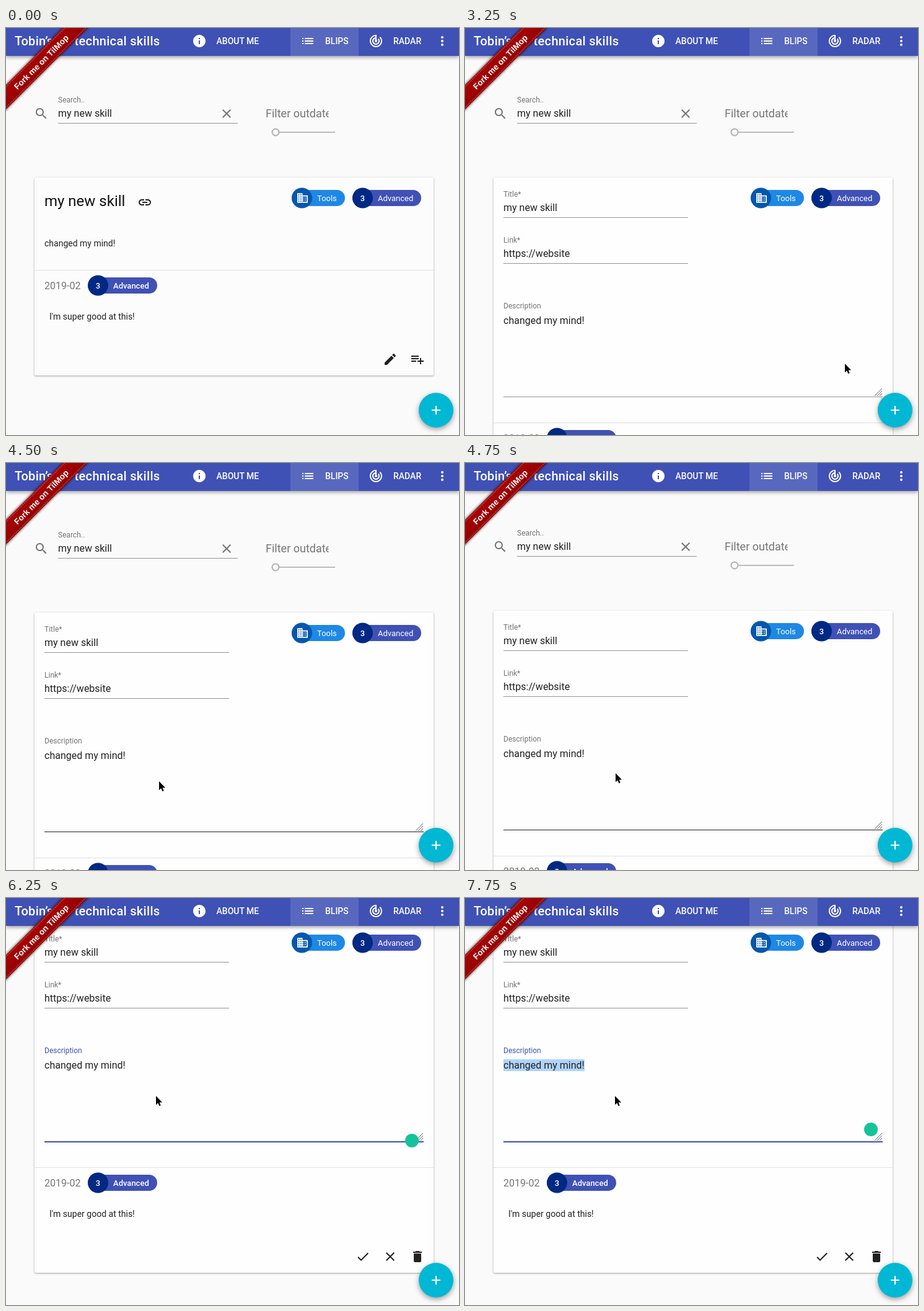
An HTML page that plays this animation: 731x656 px, repeating every 8 s.

```html
<!DOCTYPE html>
<html lang="en">
<head>
<meta charset="utf-8">
<title>Technical skills</title>
<style>
  html, body { margin: 0; width: 100%; height: 100%; overflow: hidden; background: #fafafa; }
  svg { display: block; font-family: Roboto, sans-serif; }
  .shadow { filter: drop-shadow(0 1px 1.5px rgba(0, 0, 0, .36)); }
  .bar { filter: drop-shadow(0 2px 3px rgba(0, 0, 0, .4)); }
  .fab { filter: drop-shadow(0 3px 4px rgba(0, 0, 0, .38)); }
  .ribbon { filter: drop-shadow(0 0 2px rgba(0, 0, 0, .85)); }
</style>
</head>
<body>
<svg id="stage" width="731" height="656"></svg>
<script>
const ICONS = {
  info: 'M12 2C6.48 2 2 6.48 2 12s4.48 10 10 10 10-4.48 10-10S17.52 2 12 2zm1 15h-2v-6h2v6zm0-8h-2V7h2v2z',
  list: 'M3 13h2v-2H3v2zm0 4h2v-2H3v2zm0-8h2V7H3v2zm4 4h14v-2H7v2zm0 4h14v-2H7v2zM7 7v2h14V7H7z',
  radar: 'M19.07 4.93l-1.41 1.41C19.1 7.79 20 9.79 20 12c0 4.42-3.58 8-8 8s-8-3.58-8-8c0-4.08 3.05-7.44 7-7.93v2.02C8.16 6.57 6 9.03 6 12c0 3.31 2.69 6 6 6s6-2.69 6-6c0-1.66-.67-3.16-1.76-4.24l-1.41 1.41C15.55 9.9 16 10.9 16 12c0 2.21-1.79 4-4 4s-4-1.79-4-4c0-1.86 1.28-3.41 3-3.86v2.14c-.6.35-1 .98-1 1.72 0 1.1.9 2 2 2s2-.9 2-2c0-.74-.4-1.38-1-1.72V2h-1C6.48 2 2 6.48 2 12s4.48 10 10 10 10-4.48 10-10c0-2.76-1.12-5.26-2.93-7.07z',
  more: 'M12 8c1.1 0 2-.9 2-2s-.9-2-2-2-2 .9-2 2 .9 2 2 2zm0 2c-1.1 0-2 .9-2 2s.9 2 2 2 2-.9 2-2-.9-2-2-2zm0 6c-1.1 0-2 .9-2 2s.9 2 2 2 2-.9 2-2-.9-2-2-2z',
  search: 'M15.5 14h-.79l-.28-.27C15.41 12.59 16 11.11 16 9.5 16 5.91 13.09 3 9.5 3S3 5.91 3 9.5 5.91 16 9.5 16c1.61 0 3.09-.59 4.23-1.57l.27.28v.79l5 4.99L20.49 19l-4.99-5zm-6 0C7.01 14 5 11.99 5 9.5S7.01 5 9.5 5 14 7.01 14 9.5 11.99 14 9.5 14z',
  clear: 'M19 6.41L17.59 5 12 10.59 6.41 5 5 6.41 10.59 12 5 17.59 6.41 19 12 13.41 17.59 19 19 17.59 13.41 12z',
  link: 'M3.9 12c0-1.71 1.39-3.1 3.1-3.1h4V7H7c-2.76 0-5 2.24-5 5s2.24 5 5 5h4v-1.9H7c-1.71 0-3.1-1.39-3.1-3.1zM8 13h8v-2H8v2zm9-6h-4v1.9h4c1.71 0 3.1 1.39 3.1 3.1s-1.39 3.1-3.1 3.1h-4V17h4c2.76 0 5-2.24 5-5s-2.24-5-5-5z',
  building: 'M12 7V3H2v18h20V7H12zM6 19H4v-2h2v2zm0-4H4v-2h2v2zm0-4H4V9h2v2zm0-4H4V5h2v2zm4 12H8v-2h2v2zm0-4H8v-2h2v2zm0-4H8V9h2v2zm0-4H8V5h2v2zm10 12h-8v-2h2v-2h-2v-2h2v-2h-2V9h8v10zm-2-8h-2v2h2v-2zm0 4h-2v2h2v-2z',
  edit: 'M3 17.25V21h3.75L17.81 9.94l-3.75-3.75L3 17.25zM20.71 7.04c.39-.39.39-1.02 0-1.41l-2.34-2.34c-.39-.39-1.02-.39-1.41 0l-1.83 1.83 3.75 3.75 1.83-1.83z',
  addList: 'M14 10H2v2h12v-2zm0-4H2v2h12V6zm4 8v-4h-2v4h-4v2h4v4h2v-4h4v-2h-4zM2 16h8v-2H2v2z',
  check: 'M9 16.17L4.83 12l-1.42 1.41L9 19 21 7l-1.41-1.41z',
  trash: 'M6 19c0 1.1.9 2 2 2h8c1.1 0 2-.9 2-2V7H6v12zM19 4h-3.5l-1-1h-5l-1 1H5v2h14V4z',
  plus: 'M19 13h-6v6h-2v-6H5v-2h6V5h2v6h6v2z'
};
const INK = '#212121', GREY = '#757575', LINE = '#949494', INDIGO = '#3f51b5', WHITE = '#fff';

const icon = (name, cx, cy, fill = INK, k = 1) =>
  `<path d="${ICONS[name]}" fill="${fill}" transform="translate(${cx - 12 * k} ${cy - 12 * k}) scale(${k})"/>`;
const text = (x, y, size, str, fill = INK, extra = '') =>
  `<text x="${x}" y="${y}" font-size="${size}" fill="${fill}" ${extra}>${str}</text>`;
const rect = (x, y, w, h, fill, extra = '') =>
  `<rect x="${x}" y="${y}" width="${w}" height="${h}" fill="${fill}" ${extra}/>`;
const circle = (x, y, r, fill, extra = '') =>
  `<circle cx="${x}" cy="${y}" r="${r}" fill="${fill}" ${extra}/>`;
const group = (content, extra = '') => `<g ${extra}>${content}</g>`;

const medium = 'font-weight="500"';
const middle = 'text-anchor="middle"';

function chip(x, cy, w, label, fill, badgeFill, badge, extra = '') {
  return rect(x, cy - 13, w, 26, fill, 'rx="13"') + circle(x + 16.5, cy, 16.5, badgeFill) +
    badge + text(x + 41, cy + 5, 13, label, WHITE, extra);
}
const advanced = (x, cy, w) => chip(x, cy, w, 'Advanced', INDIGO, '#002984',
  text(x + 16.5, cy + 5, 13, '3', WHITE, `${middle} ${medium}`), w > 111 ? medium : '');

const searchRow =
  icon('search', 57, 138, GREY) + text(84, 120, 12, 'Search..', GREY) +
  text(84, 143, 16, 'my new skill') + icon('clear', 356, 138, GREY) + rect(84, 153, 290, 1, LINE) +
  `<svg x="419" y="120" width="101.5" height="36">${text(0, 24, 18, 'Filter outdated', GREY)}</svg>` +
  rect(441, 167, 90, 2, '#bdbdbd') + circle(435, 168, 5.5, 'none', 'stroke="#b0b0b0" stroke-width="2"');

const chips = chip(461, 274, 86, 'Tools', '#1e88e5', '#0457ae', icon('building', 478.5, 274, WHITE, .85)) +
  advanced(559, 274, 111);

const history = rect(46, 390, 644, 1, '#e0e0e0') + text(62, 421, 16, '2019-02', GREY) +
  advanced(132, 415, 112) + text(70, 470, 14, "I'm super good at this!");

const viewMode = text(62, 287, 24, 'my new skill', '#111') + icon('link', 224, 281) +
  text(62, 352, 14, 'changed my mind!') +
  circle(620, 534, 18, '#e2e2e2', 'id="hover"') + icon('edit', 620, 534) + icon('addList', 664, 534);

const editMode =
  text(62, 272, 12, 'Title*', GREY) + text(62, 295, 16, 'my new skill') + rect(62, 305, 298, 1, LINE, 'id="titleLine"') +
  text(62, 346, 12, 'Link*', GREY) + text(62, 369, 16, 'https://website') + rect(62, 379, 298, 1, LINE, 'id="linkLine"') +
  text(62, 452, 12, 'Description', GREY, 'id="label"') +
  rect(62, 462, 131, 19, '#b0d3fb', 'id="selection"') + text(62, 477, 16, 'changed my mind!') +
  rect(193, 462, 1, 19, INK, 'id="caret"') +
  rect(62, 594, 612, 1, LINE, 'id="descLine"') + rect(62, 594, 612, 2, INDIGO, 'id="focusLine"') +
  '<path d="M661 593l12-12M665 593l8-8M669 593l4-4" stroke="#666" fill="none"/>' +
  circle(655, 593, 11, '#15c39a', 'id="badge"') +
  icon('check', 576, 780) + icon('clear', 620, 780) + icon('trash', 664, 780);

const header = rect(0, -5, 731, 50, INDIGO, 'class="bar"') + rect(459, 0, 110, 45, 'rgba(255,255,255,.13)') +
  text(14, 28, 20, 'Tobin’s', WHITE, `${medium} letter-spacing=".3"`) +
  text(248.5, 28, 20, 'technical skills', WHITE, `${medium} letter-spacing=".3" text-anchor="end"`) +
  icon('info', 312, 21, WHITE) + text(339.5, 26, 14, 'ABOUT ME', WHITE, medium) +
  icon('list', 487, 21, WHITE) + text(515, 26, 14, 'BLIPS', WHITE, medium) +
  icon('radar', 597, 21, WHITE) + text(625, 26, 14, 'RADAR', WHITE, medium) + icon('more', 704, 21, WHITE);

const stitch = y => `<path d="M-110 ${y}H110" stroke="#e0b0b0" stroke-width=".8" stroke-dasharray="2 1.5"/>`;
const ribbon = group(
  rect(-110, -14, 220, 28, 'url(#red)', 'class="ribbon"') + stitch(-12) + stitch(12) +
  text(1, 5, 13.3, 'Fork me on TilMop', WHITE, `${middle} font-weight="700" font-family="Liberation Sans, sans-serif"`),
  'transform="translate(56 55.5) rotate(-45)"');

const stage = document.getElementById('stage');
stage.innerHTML =
  '<linearGradient id="red" x2="0" y2="1"><stop stop-color="#a80505"/><stop offset="1" stop-color="#960000"/></linearGradient>' +
  group(searchRow + rect(46, 241, 644, 319, '#fdfdfd', 'id="card" rx="2" class="shadow"') + chips +
    group(history, 'id="history"') + group(viewMode, 'id="view"') + group(editMode, 'id="edit"'), 'id="page"') +
  header + ribbon +
  group(circle(694, 616, 28, '#00b8d4'), 'class="fab"') + icon('plus', 694, 616, WHITE) +
  '<path id="cursor" d="M0 0v14.2l3.2-3 2.2 5 2.3-1-2.1-4.8h4.6z" stroke="#fff" stroke-width="1.6" paint-order="stroke"/>';

const ui = {};
stage.querySelectorAll('[id]').forEach(el => ui[el.id] = el);
const show = (el, on) => el.setAttribute('display', on ? 'inline' : 'none');

// start time, then pointer position
const POINTER = [
  [500, 659, 509], [750, 620, 535], [1000, 605, 574], [1250, 614, 548], [1500, 613, 541],
  [3750, 330, 360], [4000, 285, 306], [4250, 262, 400], [4500, 247, 513], [4750, 243, 500],
  [5000, 230, 334], [5250, 242, 319]
];
// start time, then underline colour of the description
const UNDERLINE = [[0, LINE], [3500, INK], [3750, LINE], [4250, '#606060'], [4500, INK], [5000, '#4c4c4c'], [5250, INK]];
const at = (steps, t) => steps.filter(s => s[0] <= t).pop();
const within = (t, from, to) => t >= from && t < to;

function draw(t) {
  const editing = t >= 3250, focused = t >= 5750, settled = t >= 6000;
  const scroll = t < 4750 ? 0 : t < 5000 ? 3 : 202;

  ui.page.setAttribute('transform', `translate(0 ${-scroll})`);
  ui.card.setAttribute('height', editing ? 565 : 319);
  ui.card.setAttribute('fill', editing ? '#fefefe' : '#fcfcfc');
  ui.history.setAttribute('transform', `translate(0 ${editing ? 246 : 0})`);
  show(ui.view, !editing);
  show(ui.edit, editing);
  show(ui.hover, t >= 1250);

  ui.linkLine.setAttribute('fill', within(t, 3750, 4000) ? INK : LINE);
  ui.titleLine.setAttribute('fill', within(t, 4000, 4250) ? INK : within(t, 4250, 4500) ? '#707070' : LINE);
  ui.descLine.setAttribute('fill', at(UNDERLINE, t)[1]);
  ui.label.setAttribute('fill', settled ? INDIGO : focused ? '#5565a5' : GREY);

  const lineWidth = settled ? 612 : 400;
  show(ui.focusLine, focused);
  ui.focusLine.setAttribute('x', 368 - lineWidth / 2);
  ui.focusLine.setAttribute('width', lineWidth);

  show(ui.badge, focused);
  ui.badge.setAttribute('cy', t < 7000 ? 593 : 575);
  show(ui.caret, focused && (t - 5750) % 1000 < 500 && t < 7500);
  show(ui.selection, t >= 7500);

  const p = at(POINTER, t);
  show(ui.cursor, p);
  if (p) ui.cursor.setAttribute('transform', `translate(${p[1]} ${p[2]})`);
}

const start = performance.now();
function loop() {
  draw((performance.now() - start) % 8000);
  requestAnimationFrame(loop);
}
loop();
</script>
</body>
</html>
```
